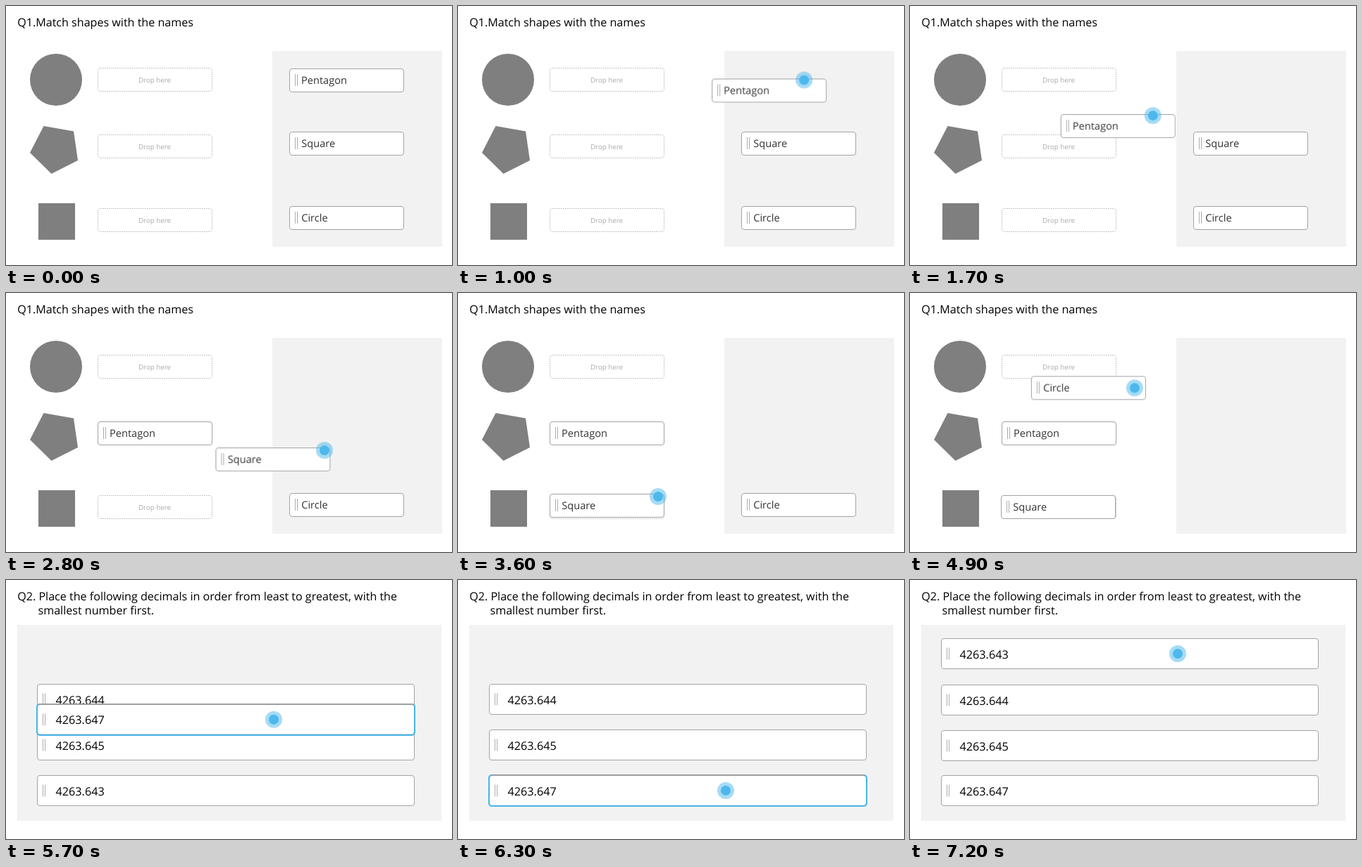
An HTML page for the animation above (8000 ms loop, 633 by 369 pixels).

```html
<!DOCTYPE html>
<html lang="en">
<head>
<meta charset="utf-8">
<title>Drag and drop questions</title>
<style>
html, body { margin: 0; width: 100%; height: 100%; overflow: hidden; background: #fff; }
svg { display: block; width: 633px; height: 369px; }
text { font-family: "Open Sans", sans-serif; text-rendering: geometricPrecision; }
.title { font-size: 16.1px; fill: #000; }
.hint { font-size: 9.75px; fill: #aaa; }
.label { font-size: 14.6px; fill: #333; }
.number { font-size: 16.2px; fill: #000; }
.shape { fill: #7f7f7f; }
.panel { fill: #f2f2f2; }
.card { fill: #fff; stroke: #a3a3a3; }
.grip { fill: none; stroke: #ababab; }
.slot { fill: #fff; stroke: #b4b4b4; stroke-dasharray: 1.5 1.5; }
.ring { fill: none; stroke: #48b4e8; stroke-width: 2; }
.lip { stroke: #9c9c9c; stroke-width: 2; }

/* The picture advances in ticks of 100 ms: 1.25% of the loop. */
.a { animation: 8s step-end infinite; }
#match { animation-name: match; }
#order { animation-name: order; }
#pointer { animation-name: pointer; }
#pentagon { animation-name: pentagon; }
#square { animation-name: square; }
#circle { animation-name: circle; }
#second { animation-name: second; }
#third { animation-name: third; }
#least { animation-name: least; }
#greatest { animation-name: greatest; }
#leastRing { animation-name: leastRing; }
#greatestRing { animation-name: greatestRing; }

@keyframes match {
  0% { visibility: visible; }
  65%, 100% { visibility: hidden; }
}
@keyframes order {
  0% { visibility: hidden; }
  65%, 100% { visibility: visible; }
}
@keyframes pentagon {
  0% { transform: translate(402px, 89px); }
  10% { transform: translate(402px, 89px); animation-timing-function: steps(13); }
  26.25%, 100% { transform: translate(130px, 183px); }
}
@keyframes square {
  0% { transform: translate(402px, 179px); }
  28.75% { transform: translate(402px, 179px); animation-timing-function: steps(13); }
  45% { transform: translate(130px, 286px); }
  46.25%, 100% { transform: translate(129px, 288px); }
}
@keyframes circle {
  0% { transform: translate(402px, 285px); }
  47.5% { transform: translate(402px, 285px); animation-timing-function: steps(13); }
  63.75%, 100% { transform: translate(130px, 88px); }
}
@keyframes second {
  0% { transform: translate(44px, 148px); }
  90%, 100% { transform: translate(44px, 149px); }
}
@keyframes third {
  0% { transform: translate(44px, 213px); }
  90%, 100% { transform: translate(44px, 214px); }
}
@keyframes greatest {
  0% { transform: translate(44px, 83px); }
  66.25% { transform: translate(44px, 83px); animation-timing-function: steps(9); }
  77.5% { transform: translate(44px, 294px); }
  78.75%, 100% { transform: translate(44px, 278px); }
}
@keyframes least {
  0% { transform: translate(44px, 278px); }
  78.75% { transform: translate(44px, 278px); animation-timing-function: steps(8); }
  88.75%, 100% { transform: translate(44px, 83px); }
}
@keyframes greatestRing {
  0% { opacity: 0; }
  67.5% { opacity: 1; }
  80%, 100% { opacity: 0; }
}
@keyframes leastRing {
  0% { opacity: 0; }
  80% { opacity: 1; }
  90%, 100% { opacity: 0; }
}
@keyframes pointer {
  0% { transform: translate(613px, 73px); opacity: 0; }
  2.5% { transform: translate(613px, 73px); opacity: 1; animation-timing-function: steps(6); }
  10% { transform: translate(533px, 91px); opacity: 1; animation-timing-function: steps(13); }
  26.25% { transform: translate(261px, 185px); opacity: 1; }
  27.5% { transform: translate(552px, 183px); opacity: 1; }
  28.75% { transform: translate(557px, 183px); opacity: 1; animation-timing-function: steps(13); }
  45% { transform: translate(284px, 290px); opacity: 1; }
  46.25% { transform: translate(544px, 302px); opacity: 1; }
  47.5% { transform: translate(549px, 302px); opacity: 1; animation-timing-function: steps(13); }
  63.75% { transform: translate(277px, 105px); opacity: 1; }
  65% { transform: translate(380px, 105px); opacity: 1; }
  66.25% { transform: translate(380px, 105px); opacity: 1; animation-timing-function: steps(9); }
  77.5% { transform: translate(380px, 316px); opacity: 1; }
  78.75% { transform: translate(380px, 300px); opacity: 1; animation-timing-function: steps(8); }
  88.75%, 100% { transform: translate(380px, 105px); opacity: 1; }
}
</style>
</head>
<body>
<svg viewBox="0 0 633 369">
  <defs>
    <g id="slot">
      <rect class="slot" x=".5" y=".5" width="162" height="33" rx="3.5"/>
      <text class="hint" x="58" y="21">Drop here</text>
    </g>
    <g id="card">
      <rect class="card" x=".5" y=".5" width="162" height="33" rx="3.5"/>
      <path class="grip" d="M8.5 8v17M11.5 8v17"/>
    </g>
    <g id="row">
      <rect class="card" x=".5" y=".5" width="535" height="43" rx="3.5"/>
      <path class="grip" d="M8.5 13.5v17M11.5 13.5v17"/>
    </g>
    <g id="ring">
      <rect class="ring" width="536" height="44" rx="4"/>
      <path class="lip" d="M3 0H533"/>
    </g>
  </defs>

  <g id="match" class="a">
    <text class="title" x="16.2" y="29">Q1.Match shapes with the names</text>
    <rect class="panel" x="378" y="64" width="241" height="279"/>
    <circle class="shape" cx="71" cy="105" r="37"/>
    <path class="shape" d="M53.5 171L96 178.500L102 220L64.500 239L34 209z"/>
    <rect class="shape" x="46" y="281" width="52" height="52"/>
    <use href="#slot" x="130" y="88"/>
    <use href="#slot" x="130" y="183"/>
    <use href="#slot" x="130" y="288"/>
    <g id="pentagon" class="a"><use href="#card"/><text class="label" x="17" y="22">Pentagon</text></g>
    <g id="square" class="a"><use href="#card"/><text class="label" x="17.300" y="22">Square</text></g>
    <g id="circle" class="a"><use href="#card"/><text class="label" x="17.200" y="22">Circle</text></g>
  </g>

  <g id="order" class="a">
    <text class="title" x="16.2" y="29">Q2. Place the following decimals in order from least to greatest, with the</text>
    <text class="title" x="45.5" y="49">smallest number first.</text>
    <rect class="panel" x="16" y="64" width="602" height="279"/>
    <g id="second" class="a"><use href="#row"/><text class="number" x="26.600" y="28.500">4263.644</text></g>
    <g id="third" class="a"><use href="#row"/><text class="number" x="26.600" y="28.500">4263.645</text></g>
    <g id="least" class="a">
      <use href="#row"/><text class="number" x="26.600" y="28.500">4263.643</text>
      <use id="leastRing" class="a" href="#ring"/>
    </g>
    <g id="greatest" class="a">
      <use href="#row"/><text class="number" x="26.600" y="28.500">4263.647</text>
      <use id="greatestRing" class="a" href="#ring"/>
    </g>
  </g>

  <g id="pointer" class="a">
    <circle r="12" fill="#4db8ec" fill-opacity=".5"/>
    <circle r="7" fill="#4db8ec"/>
  </g>
</svg>
</body>
</html>
```
